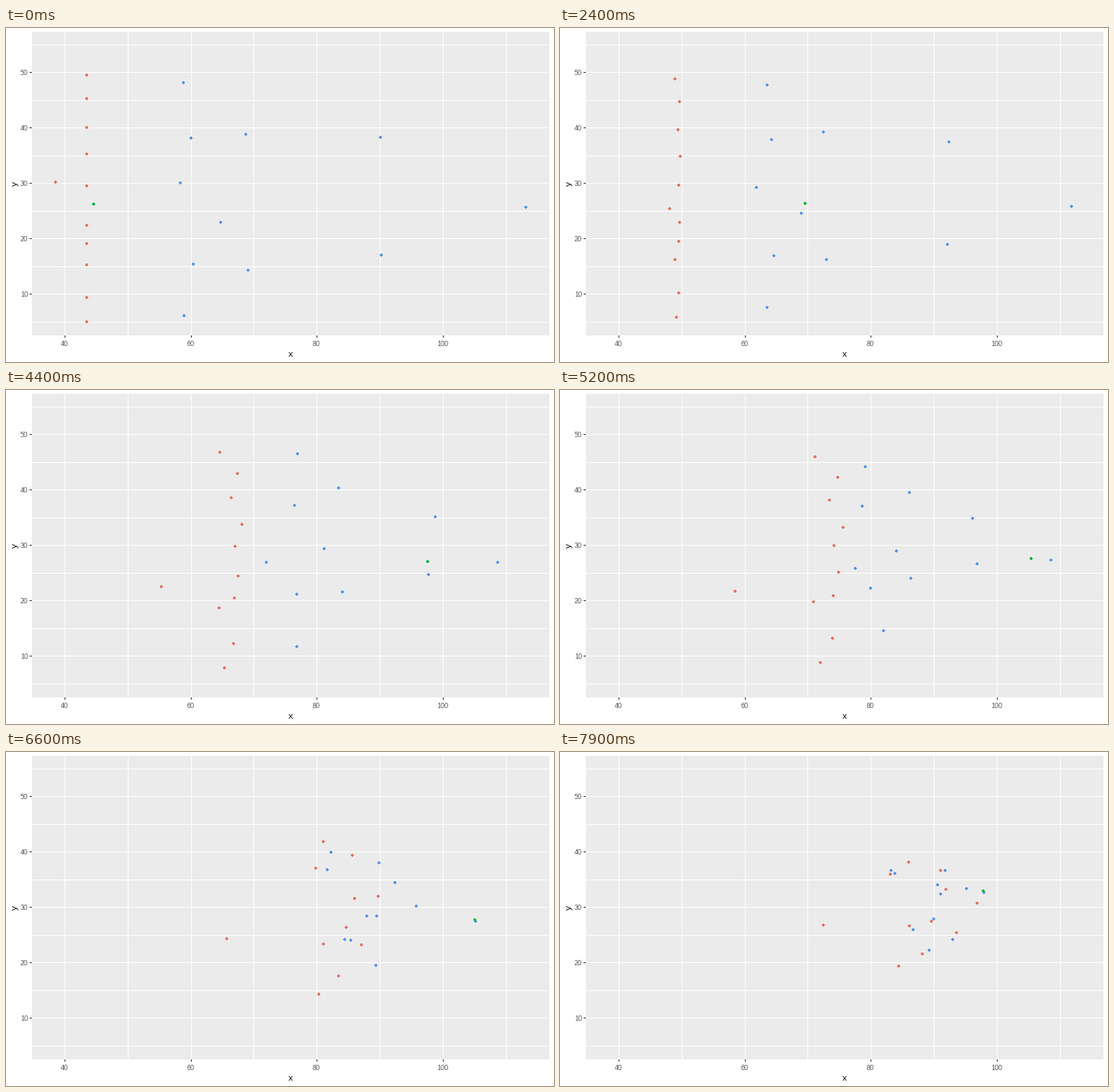
A matplotlib script for the animation above (8 s loop, 720 by 440 pixels).

```python
import numpy as np
import matplotlib.pyplot as plt
from matplotlib.animation import FuncAnimation
from matplotlib.patches import Rectangle
from matplotlib.path import Path

W, H, DPI = 720, 440, 80
PT = 72 / DPI  # points per pixel
FRAMES, STEP = 80, 100
END = (FRAMES - 1) * STEP / 1000
RED, BLUE, GREEN = "#E57468", "#5898EA", "#00BA38"
t = np.arange(FRAMES) * STEP / 1000

# Key points: start y on the kick-off line, turn, end
LINE_X, KICK_TURN = 106, 5.2
KICK_TEAM = [
    (62, (335, 88), (458, 145)),
    (93, (365, 115), (500, 156)),
    (131, (354, 145), (434, 161)),
    (166, (372, 181), (548, 199)),
    (208, (360, 205), (507, 181)),
    (260, (366, 240), (488, 223)),
    (284, (359, 271), (521, 238)),
    (312, (333, 279), (459, 229)),
    (355, (358, 327), (476, 266)),
    (387, (342, 359), (445, 282)),
]

# Key points: start, turn, end
RETURN_TURN = 4.4
RETURN_TEAM = [
    ((233, 72), (383, 84), (440, 160)),
    ((243, 145), (379, 152), (435, 156)),
    ((315, 140), (437, 129), (506, 156)),
    ((492, 144), (564, 167), (496, 175)),
    ((229, 204), (342, 227), (485, 261)),
    ((282, 256), (418, 209), (491, 220)),
    ((493, 299), (555, 243), (534, 180)),
    ((246, 311), (382, 269), (464, 234)),
    ((318, 319), (442, 266), (500, 187)),
    ((234, 379), (382, 338), (516, 247)),
]


def run_up(s):
    """Distance run: standing, then easing into a steady pace."""
    return 0.35 * np.log1p(np.exp((s - 1.78) / 0.35))


def player(start, turn, end, turn_time):
    """Run from start to turn, then close in on end while slowing down."""
    start, turn, end = map(np.array, (start, turn, end))
    run = run_up(np.minimum(t, turn_time)) / run_up(turn_time)
    u = np.clip((t - turn_time) / (END - turn_time), 0, 1)
    close = np.column_stack([1 - (1 - u) ** 1.5, u])
    return start + run[:, None] * (turn - start) + close * (end - turn)


def route(*keys):
    """Straight legs through (seconds, x, y)."""
    at, x, y = zip(*keys)
    return np.column_stack([np.interp(t, at, x), np.interp(t, at, y)])


def ball_path(carrier, kick=1.18, caught=5.5):
    """Flight slowed by drag, then carried by the returner."""
    s = np.maximum(t - kick, 0)
    flight = np.column_stack([115 + 815 * (1 - np.exp(-0.24 * s)),
                              232 - 0.62 * s ** 2])
    return np.where(t[:, None] < caught, flight, carrier + (-1, -2))


kicker = route((0, 65, 203), (1.5, 121, 225), (3.2, 165, 249),
               (5.2, 230, 265), (END, 346, 228))
returner = route((0, 683, 236), (1.5, 679, 237), (2.7, 670, 234),
                 (4.4, 646, 227), (5.6, 645, 222), (6.6, 617, 223),
                 (END, 557, 185))
reds = [player((LINE_X, y), turn, end, KICK_TURN) for y, turn, end in KICK_TEAM]
blues = [player(*keys, RETURN_TURN) for keys in RETURN_TEAM]
tracks = reds + [kicker] + blues + [returner, ball_path(returner)]
places = np.rint(np.stack(tracks, axis=1))
colors = [RED] * 11 + [BLUE] * 11 + [GREEN]

# Crisp pixel-fitted lettering
plt.rcParams.update({"font.family": "Liberation Sans",
                     "text.hinting": "native", "text.hinting_factor": 1})
fig = plt.figure(figsize=(W / DPI, H / DPI), dpi=DPI, facecolor="white")
ax = fig.add_axes([0, 0, 1, 1])
ax.set(xlim=(0, W), ylim=(H, 0))
ax.axis("off")


def box(x, y, w, h, color):
    ax.add_patch(Rectangle((x, y), w, h, fc=color, lw=0, antialiased=False))


def label(x, y, s, size=9, color="#4D4D4D", **kw):
    ax.text(x, y, s, size=size * PT, color=color, **kw)


L, T, R, B = 34, 5, 714, 405
box(L, T, R - L, B - T, "#EBEBEB")
for i in range(8):
    x = int(77.5 + 82.8 * i)
    box(x, T, 1, B - T, "white")
    if i % 2 == 0:
        box(x, B, 1, 3, "#333333")
        label(x, 419, 40 + 10 * i, ha="center", va="baseline")
for i in range(11):
    y = 22 + 36.5 * i
    box(L, int(y), R - L, 1, "white")
    if i % 2:
        box(L - 3, int(y), 3, 1, "#333333")
        label(29, int(y) + 4, 55 - 5 * i, ha="right", va="baseline")
label(374, 433, "x", 11, "black", ha="center", va="baseline")
label(12, 205, "y", 11, "black", ha="center", va="center", rotation=90)

# Four-pixel dot with the corners cut
dot = Path([(-2, -1), (-1, -1), (-1, -2), (1, -2), (1, -1), (2, -1), (2, 1),
            (1, 1), (1, 2), (-1, 2), (-1, 1), (-2, 1), (-2, -1)])
dots = ax.scatter(*places[0].T, s=(4 * PT) ** 2, c=colors, marker=dot,
                  linewidths=0, antialiased=False, zorder=3)


def draw(i):
    dots.set_offsets(places[i])
    return dots,


anim = FuncAnimation(fig, draw, frames=FRAMES, interval=STEP,
                     repeat=True, repeat_delay=0)
plt.show()
```
